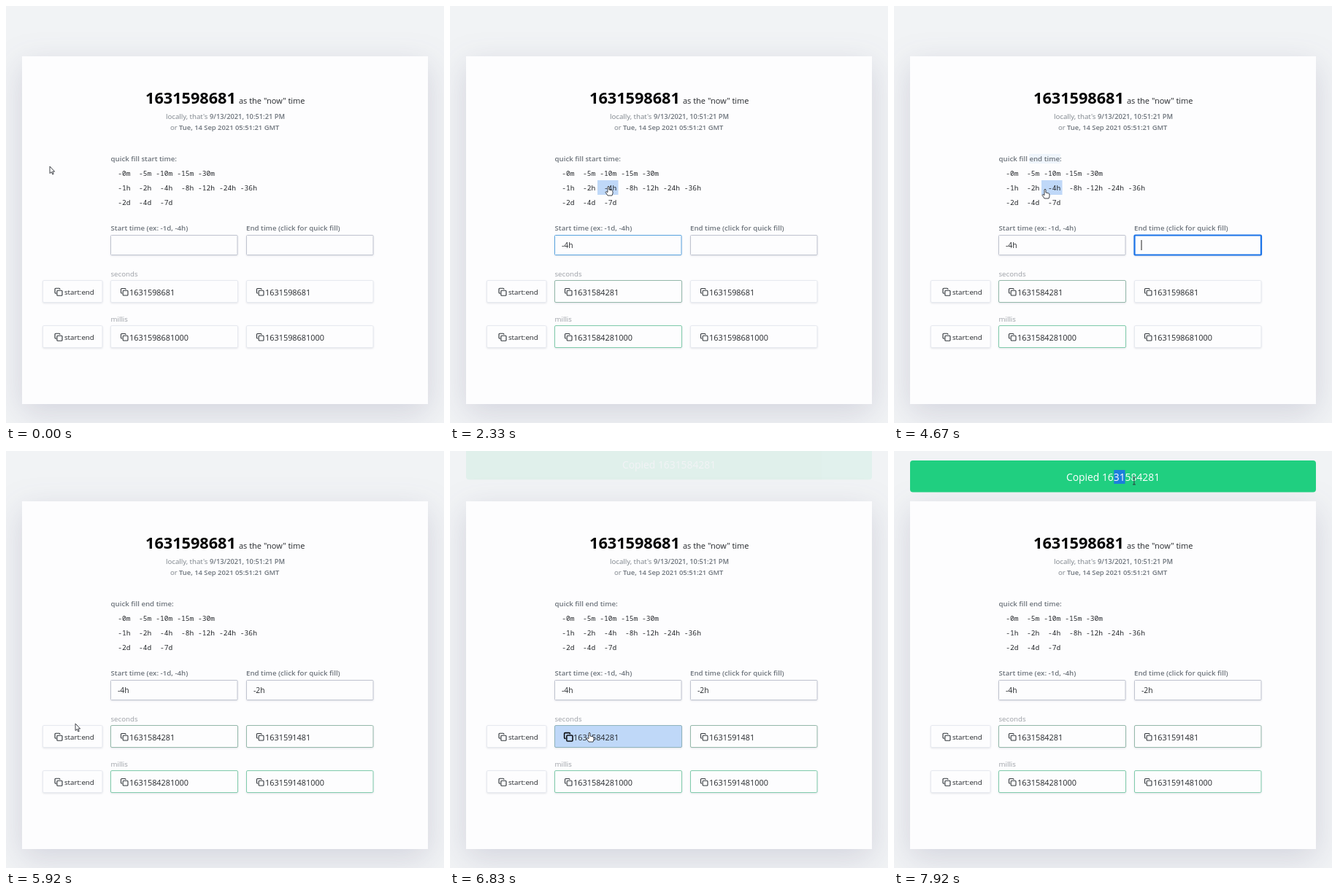
Write an HTML page that moves like this. It is 600x572 px and loops after 8000 ms.

```html
<!DOCTYPE html>
<html lang="en">
<head>
<meta charset="utf-8">
<title>Epoch time helper</title>
<style>
  html, body { margin: 0; width: 100%; height: 100%; overflow: hidden; background: #f1f3f5; }
  svg { display: block; width: 600px; height: 572px; }
  text { font: 9.7px "Open Sans", "Noto Sans", sans-serif; fill: #24272b; white-space: pre; }
  .label { font-weight: 600; fill: #6c737b; }
  .soft { fill: #7c838a; }
  .faint { fill: #9b9fa5; }
  .value { font-size: 10.9px; }
  .quick { font: 9.6px "Noto Sans Mono", "DejaVu Sans Mono", monospace; text-anchor: end; }
  .card { fill: #fdfdfe; filter: drop-shadow(0 12px 22px rgba(65, 60, 105, .17)); }
  .field { filter: drop-shadow(0 1px 1px rgba(40, 50, 80, .12)); }
  .icon { fill: none; stroke: #33383d; }
</style>
</head>
<body>
<svg id="stage" viewBox="0 0 600 572"></svg>
<script>
const LOOP = 8000, STEP = 1000 / 12;
const NOW = 1631598681, MINUS_4H = 1631584281, MINUS_2H = 1631591481;
const START_CLICK = 2320, END_FOCUS = 3570, END_CLICK = 4990, COPY_CLICK = 6670;
const HOVER = '#bfd8f8', PAPER = '#fdfdfe';
const stage = document.getElementById('stage');

function add(tag, attrs, content = '', parent = stage) {
  const node = document.createElementNS('http://www.w3.org/2000/svg', tag);
  set(node, attrs);
  node.textContent = content;
  return parent.appendChild(node);
}
function set(node, attrs) {
  for (const name in attrs) node.setAttribute(name, attrs[name]);
}
const text = (x, y, content, cls = '', style = '', parent = stage) =>
  add('text', { x, y, class: cls, style }, content, parent);
const rect = (x, y, width, height, attrs = {}, parent = stage) =>
  add('rect', { x, y, width, height, ...attrs }, '', parent);

rect(22, 69, 556, 477, { class: 'card' });

text(191, 133.5, NOW, '', 'font-size:21.7px;font-weight:700;fill:#050505');
text(319, 133.5, 'as the "now" time', '', 'font-size:11px');
text(219, 155, "locally, that's ", 'soft');
text(279, 155, '9/13/2021, 10:51:21 PM', 'label', 'font-size:9.3px');
text(225, 170, 'or', 'soft');
text(237, 170, 'Tue, 14 Sep 2021 05:51:21 GMT', 'label', 'font-size:9.4px');

const flash = rect(185, 203, 43, 13, { fill: '#cfe3f6' });
const quickLabel = text(143.5, 213, '', 'label');

// Quick fill grid
const rows = ['-0m -5m -10m -15m -30m', '-1h -2h -4h -8h -12h -24h -36h', '-2d -4d -7d'].map(r => r.split(' '));
const spot = rect(0, 0, 28.5, 20, { fill: HOVER });
rows.forEach((row, r) => row.forEach((name, c) => text(170.5 + 28.9 * c, 233 + 20 * r, name, 'quick')));

text(143.5, 308, 'Start time (ex: -1d, -4h)', 'label');
text(329, 308, 'End time (click for quick fill)', 'label');
function input(x) {
  return {
    box: rect(x, 314.5, 173.5, 27, { class: 'field', fill: PAPER, rx: 1 }),
    text: text(x + 9.5, 332, '', '', 'font-size:10.3px')
  };
}
const startInput = input(143.5), endInput = input(329.5);
const caret = rect(338.5, 321, 1, 14, { fill: '#222' });

// Copy buttons
function button(x, y, w, iconX, size, textX, cls) {
  const box = rect(x, y, w, 30, { class: 'field', rx: 1.5 });
  const icon = add('path', {
    class: 'icon',
    d: 'M4.2 3.3H9Q10 3.3 10 4.3V9Q10 10 9 10H4.2Q3.2 10 3.2 9V4.3Q3.2 3.3 4.2 3.3ZM2.2 7H1.5Q.5 7 .5 6V1.5Q.5 .5 1.5 .5H6Q7 .5 7 1.5V2'
  });
  return { x, y, w, box, icon, iconX, size, text: text(textX, y + 20, '', cls) };
}
const buttons = [];
[['seconds', 376.5], ['millis', 438.5]].forEach(([name, y]) => {
  text(143.5, y - 5.5, name, 'faint');
  const pair = button(50.5, y, 81.5, 66.5, 10.5, 80, '');
  pair.text.textContent = 'start:end';
  pair.text.setAttribute('y', y + 19.5);
  buttons.push(pair, button(143.5, y, 174, 157, 10, 169, 'value'), button(329.5, y, 173.5, 343, 10, 355, 'value'));
});

const toast = add('g', {});
rect(22, 0, 556, 43.5, { rx: 4, fill: '#20cf80' }, toast);
const selection = rect(301.3, 13, 0, 19, { fill: '#1b7fdc' }, toast);
text(236, 28, 'Copied ' + MINUS_4H, '', 'font-size:13.85px;fill:#fff', toast);

const cursor = add('path', { 'stroke-linejoin': 'round' });
const shapes = {
  arrow: 'M0 0V9.6L2.2 7.6L3.8 11L5.2 10.4L3.7 7.1H6.6Z',
  hand: 'M-1 1Q0-1 1 1V5L4.5 5.8Q6 6 6 8V10L5 13H-1L-4 8.5Q-4 6.5-1 8.5Z',
  beam: 'M-2-5H2M0-5V5M-2 5H2'
};
// Pointer path: time, x, y
const path = [
  [0, 60, 220], [500, 90, 236], [590, 90, 236], [1417, 186, 259.5], [1750, 178, 245],
  [2000, 217, 247], [2417, 217, 247], [3000, 300, 300], [3333, 360, 308.5], [3667, 360, 308.5],
  [4167, 222, 244], [4340, 222, 244], [4667, 207, 251], [4833, 191, 246], [5417, 191, 246],
  [5917, 95, 374], [6040, 103, 388], [6250, 191, 386], [6920, 191, 386], [7417, 290, 62],
  [7440, 290, 62], [7667, 301, 40], [7917, 329, 41], [8000, 329, 41]
];
function pointerAt(t) {
  const i = Math.max(1, path.findIndex(p => p[0] >= t));
  const [t0, x0, y0] = path[i - 1], [t1, x1, y1] = path[i];
  const k = (t - t0) / (t1 - t0);
  return [x0 + (x1 - x0) * k, y0 + (y1 - y0) * k];
}
const inside = (x, y, left, top, w, h) => x >= left && x < left + w && y >= top && y < top + h;

function draw(t) {
  const [x, y] = pointerAt(t);
  const startSet = t >= START_CLICK, endMode = t >= END_FOCUS, endSet = t >= END_CLICK;
  const focused = endMode && !endSet;

  const col = Math.floor((x - 144) / 29), row = Math.floor((y - 219) / 20);
  const onQuick = Boolean(rows[row] && rows[row][col]);
  set(spot, { x: 144 + 29 * col, y: 219 + 20 * row, visibility: onQuick ? 'visible' : 'hidden' });

  quickLabel.textContent = `quick fill ${endMode ? 'end' : 'start'} time:`;
  set(flash, { opacity: endMode ? Math.max(0, 1 - (t - END_FOCUS) / 1600) : 0 });

  const idle = '#bfc3cf', ready = '#58a3df';
  startInput.text.textContent = startSet ? '-4h' : '';
  endInput.text.textContent = endSet ? '-2h' : '';
  set(startInput.box, { stroke: onQuick && !endMode ? ready : idle });
  set(endInput.box, {
    stroke: focused ? '#1a73e8' : onQuick && endMode ? ready : idle,
    'stroke-width': focused ? 2.2 : 1
  });
  set(caret, { opacity: focused && (t - END_FOCUS) % 1060 < 530 ? 1 : 0 });

  let onButton = false;
  buttons.forEach((b, i) => {
    const kind = i % 3, millis = i > 2;
    const over = inside(x, y, b.x, b.y, b.w, 30);
    const changed = kind === 1 ? startSet : kind === 2 && endSet;
    onButton = onButton || over;
    set(b.box, {
      fill: over ? HOVER : PAPER,
      stroke: over ? '#8fb3bd' : changed ? (millis ? '#7fcbab' : '#94b8aa') : '#e6e9ef'
    });
    const size = b.size + (over ? 2 : 0);
    set(b.icon, {
      'stroke-width': over ? 1.3 : 1.1,
      style: over ? 'stroke:#0c0e10' : '',
      transform: `translate(${b.iconX - (over ? 1 : 0)} ${b.y + 15.5 - size / 2}) scale(${size / 10})`
    });
    if (kind) {
      const value = kind === 1 ? (startSet ? MINUS_4H : NOW) : (endSet ? MINUS_2H : NOW);
      b.text.textContent = value + (millis ? '000' : '');
    }
  });

  const p = Math.min(1, Math.max(0, (t - COPY_CLICK) / 600));
  const slide = 21 * (1 - p * p * (3 - 2 * p));
  set(toast, { opacity: p * p, transform: `translate(0 ${13 - slide})` });
  set(selection, { width: t >= 7825 ? 15.2 : t >= 7745 ? 7.6 : 0 });

  const onLabel = inside(x, y, 329, 298, 129, 14);
  const onText = inside(x, y, 236, 24, 128, 24) || inside(x, y, 143, 314, 174, 28) || inside(x, y, 329, 314, 174, 28);
  const shape = onQuick || onButton || onLabel ? 'hand' : onText ? 'beam' : 'arrow';
  set(cursor, {
    d: shapes[shape], transform: `translate(${x} ${y})`,
    fill: shape === 'beam' ? 'none' : '#fff', stroke: '#2c2f36', 'stroke-width': .9
  });
}

function tick(now) {
  const t = now % LOOP;
  draw(Math.floor((t + 5) / STEP) * STEP);
  requestAnimationFrame(tick);
}
requestAnimationFrame(tick);
</script>
</body>
</html>
```
